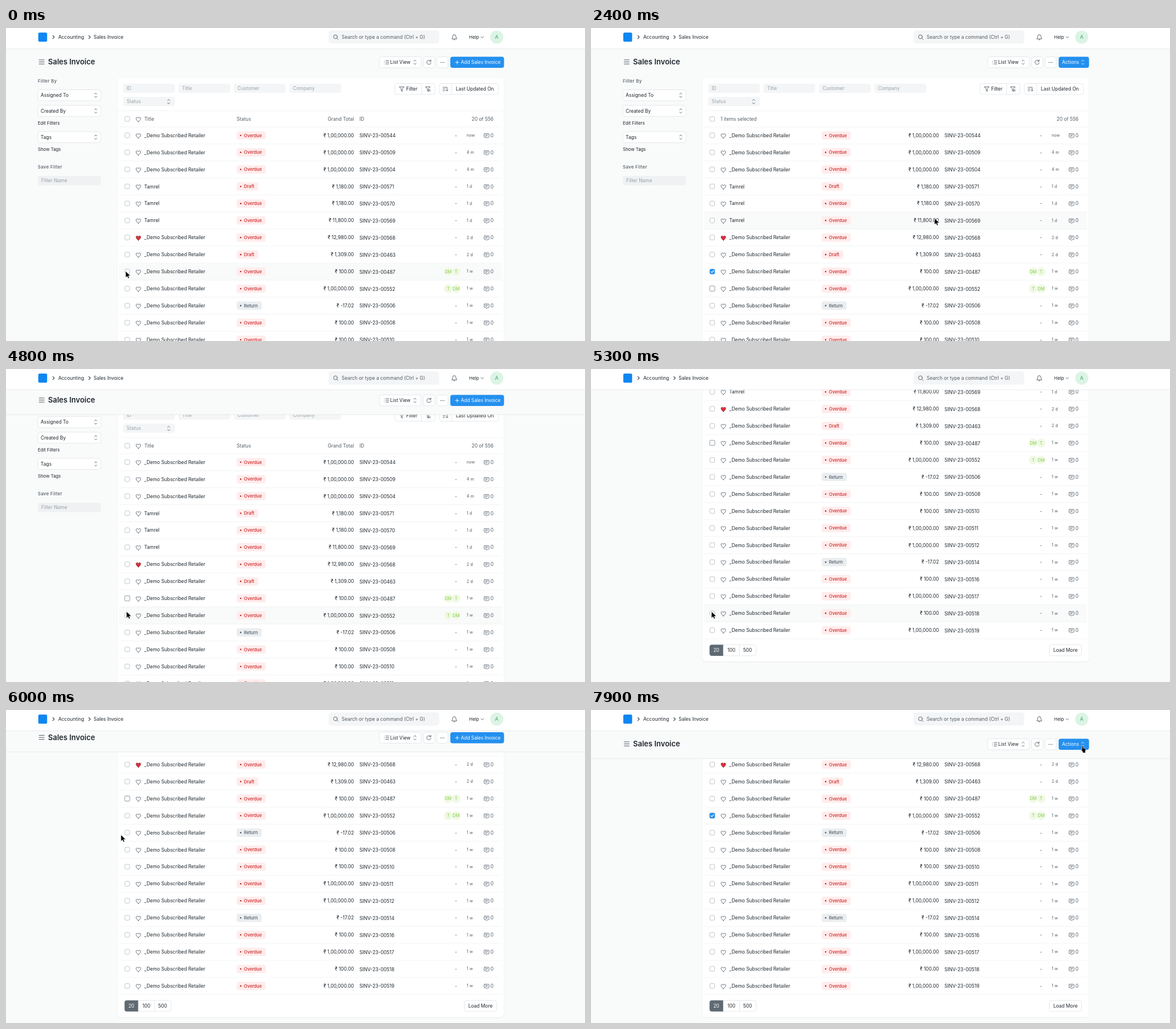
These frames come from a looping animation (1019 px wide and 550 px high, 8000 ms). An HTML page:

```html
<!DOCTYPE html>
<html lang="en">
<head>
<meta charset="utf-8">
<title>Sales Invoice list</title>
<style>
  html, body { margin: 0; width: 100%; height: 100%; overflow: hidden; background: #f9fafa; }
  svg { display: block; width: 1019px; height: 550px; }
  text { font-family: Inter, sans-serif; white-space: pre; }
  .ln { fill: none; stroke: #4c5a67; stroke-width: .9; stroke-linecap: round; stroke-linejoin: round; }
</style>
</head>
<body>
<svg id="stage" viewBox="0 0 1019 550" xmlns="http://www.w3.org/2000/svg"></svg>
<script>
const LOOP = 8000, PITCH = 29.92, FIRST = 188.7;
const INK = '#1f272e', GREY = '#505a62', HINT = '#98a1a9', BLUE = '#2490ef', PAGE = '#f9fafa';

// Drawing helpers: every label is placed by the middle of its capitals.
const text = (x, cy, s, { size = 8.42, fill = INK, weight = 400, anchor = 'start', gap = 0 } = {}) =>
  `<text x="${x}" y="${(cy + size * .364).toFixed(2)}" font-size="${size}" fill="${fill}" font-weight="${weight}" text-anchor="${anchor}"${gap ? ` letter-spacing="${gap}"` : ''}>${s}</text>`;
const box = (x, y, w, h, r, fill, extra = '') =>
  `<rect x="${x}" y="${y}" width="${w}" height="${h}" rx="${r}" fill="${fill}" ${extra}/>`;
const disc = (x, y, r, fill, extra = '') => `<circle cx="${x}" cy="${y}" r="${r}" fill="${fill}" ${extra}/>`;
const line = (d, extra = '') => `<path class="ln" d="${d}" ${extra}/>`;
const rule = (x1, x2, y, color = '#eef0f2') => `<path d="M${x1} ${y}H${x2}" stroke="${color}" stroke-width=".7"/>`;
const group = (id, body) => `<g id="${id}">${body}</g>`;

const button = (x, cy, w, fill = '#fff', h = 19.4) =>
  box(x, cy - h / 2, w, h, 4, fill, fill === '#fff' ? 'stroke="#dfe3e6" stroke-width=".8"' : '');
const sorter = (x, cy, color = '#4c5a67') =>
  line(`M${x - 2} ${cy - 1.9}l2-2 2 2M${x - 2} ${cy + 1.9}l2 2 2-2`, `style="stroke:${color}"`);
const chevron = (x, y) => line(`M${x - 1.3} ${y - 2.7}l2.7 2.7-2.7 2.7`, 'style="stroke:#333c44;stroke-width:1.1"');
const heart = (x, y, on) => line(
  `M${x} ${y + 4.2}C${x - 7} ${y - .6} ${x - 3.6} ${y - 6} ${x} ${y - 2.1}C${x + 3.6} ${y - 6} ${x + 7} ${y - .6} ${x} ${y + 4.2}Z`,
  on ? 'style="fill:#e02d3c;stroke:#8c3038"' : '');
const checkbox = (y, id = '') =>
  (id ? box(208.2, y - 5.4, 10.4, 10.8, 3.2, '#bcc3c9', `id="ring${id}"`) : '') +
  box(209.2, y - 4.2, 8.4, 8.4, 2.2, '#fff', 'stroke="#a9b2ba" stroke-width=".75"') +
  (id ? group('tick' + id, box(208.9, y - 4.5, 9, 9, 2.2, BLUE) +
    line(`M211.1 ${y + .2}l1.7 1.7 3.1-3.6`, 'style="stroke:#fff;stroke-width:1.2"')) : '');

const BADGES = {
  Overdue: [51, '#ffecec', '#cb2929'],
  Draft: [38, '#ffecec', '#cb2929'],
  Return: [44, '#ebeef0', '#4c5a67']
};
const badge = (y, name) => {
  const [w, bg, fg] = BADGES[name];
  return box(406, y - 7.3, w, 14.6, 3.6, bg) + disc(413, y, 1.3, fg) +
    text(418.8, y, name, { size: 7.7, fill: fg, weight: 500 });
};
const avatar = (x, y, s) => disc(x, y, 8, '#eff9e3', 'stroke="#fff" stroke-width=".8"') +
  text(x, y, s, { size: 7.5, fill: '#86cc4c', anchor: 'middle' });

// List data
const IDS = '544 509 504 571 570 569 568 463 487 552 506 508 510 511 512 514 516 517 518 519'.split(' ');
const LAKH = '1,00,000.00';
const AMOUNTS = [LAKH, LAKH, LAKH, '1,180.00', '1,180.00', '11,800.00', '12,980.00', '1,309.00', '100.00', LAKH,
  '-17.02', '100.00', '100.00', LAKH, LAKH, '-17.02', '100.00', LAKH, '100.00', LAKH];
const AGES = ['now', '4 m', '4 m', '1 d', '1 d', '1 d', '2 d', '2 d'];
const statusOf = i => i === 3 || i === 7 ? 'Draft' : AMOUNTS[i][0] === '-' ? 'Return' : 'Overdue';
const rowY = i => FIRST + i * PITCH;

function row(i) {
  const y = rowY(i);
  const people = { 8: ['DM', 'T'], 9: ['T', 'DM'] }[i];
  return checkbox(y - .1, i === 8 || i === 9 ? i : '') + heart(233, y + .6, i === 6) +
    text(243.3, y, i > 2 && i < 6 ? 'Tamrel' : '_Demo Subscribed Retailer') +
    badge(y, statusOf(i)) +
    text(612.3, y, '₹ ' + AMOUNTS[i], { anchor: 'end' }) +
    text(622, y + .5, 'SINV-23-00' + IDS[i]) +
    (people ? avatar(778.3, y, people[0]) + avatar(792.2, y, people[1])
            : text(792, y, '-', { anchor: 'middle', fill: GREY })) +
    text(810.8, y - .2, AGES[i] || '1 w', { size: 7.15, fill: GREY }) +
    line(`M842.6 ${y - 3}h6.4q1.2 0 1.2 1.2v4q0 1.2-1.2 1.2h-1.8l-1.4 1.6-1.4-1.6h-1.8q-1.2 0-1.2-1.2v-4q0-1.2 1.2-1.2ZM843.7 ${y - .8}h4.3M843.7 ${y + 1.2}h2.8`, 'style="stroke-width:.8"') +
    text(852.8, y, '0', { fill: GREY }) + rule(199.5, 872.5, y + 15);
}

const select = (cy, label) => button(56, cy, 111) + text(61, cy, label) + sorter(158, cy);
const sidebar = () =>
  text(56, 93.4, 'Filter By', { size: 7.8, fill: GREY, weight: 500, gap: .35 }) +
  select(118.2, 'Assigned To') + select(145.7, 'Created By') +
  text(56, 167, 'Edit Filters', { size: 7.8 }) + select(191.8, 'Tags') +
  text(56, 213, 'Show Tags', { size: 7.8 }) +
  text(56, 244.4, 'Save Filter', { size: 7.8, fill: GREY, weight: 500, gap: .35 }) +
  box(56, 260, 111, 16.6, 4, '#eff1f2') + text(62, 268.4, 'Filter Name', { fill: HINT });

const funnel = (x, cross) => line(`M${x - 4} 103.4h8l-3.1 3.9v3.9l-1.8-1v-2.9Z`) +
  (cross ? line(`M${x + 1.4} 108.2l3 3M${x + 4.4} 108.2l-3 3`) : '');
const filters = () => ['ID', 'Title', 'Customer', 'Company'].map((s, i) =>
    box(206 + i * 97.6, 97.8, 91, 16.3, 4, '#f4f5f6') + text(212.3 + i * 97.6, 106, s, { fill: HINT })).join('') +
  box(206, 121, 91, 16.3, 4, '#f4f5f6') + text(212.3, 129.2, 'Status', { fill: HINT }) + sorter(286.3, 129.4) +
  button(684.3, 107.2, 70.8) + rule(731.2, 731.9, 107.2, '#e2e6e9') +
  `<path d="M731.5 97.6v19.2M784.4 97.6v19.2" stroke="#dfe3e6" stroke-width=".8"/>` +
  funnel(696.5) + text(704.2, 107.2, 'Filter') + funnel(742.5, true) +
  button(762.7, 107.2, 104).replace('#fff', 'none') +
  line('M769 104.2h6M769 107.2h4M769 110.2h3M776.2 104v6.6M774.4 109l1.8 1.8 1.8-1.8') +
  text(791.8, 107.2, 'Last Updated On');

function footer() {
  const y = 792.3, mid = (x, s, fill = INK) => text(x, y, s, { fill, anchor: 'middle' });
  return button(208.7, y, 81.8) + `<path d="M232.6 782.6H212.7q-4 0-4 4v11.4q0 4 4 4h19.9Z" fill="#5f6a73"/>` +
    `<path d="M261.5 782.7v19.2" stroke="#dfe3e6" stroke-width=".8"/>` +
    mid(220.6, '20', '#fff') + mid(247, '100') + mid(275.6, '500') +
    button(806.5, y, 57) + mid(835, 'Load More');
}

const card = () =>
  box(195.2, 87.6, 681.8, 725.4, 6.5, '#e9ecee') + box(195.7, 87.4, 680.8, 724.6, 6.2, '#fff') +
  filters() + rule(196, 876.5, 145.6) + rule(199.5, 872.5, 174) +
  `<rect id="hover" x="199.5" width="673" height="${PITCH}" fill="#f9fafa"/>` +
  checkbox(159.8) +
  group('columns', heart(233, 160.4) + text(243.4, 159.8, 'Title', { fill: GREY }) +
    text(406, 159.8, 'Status', { fill: GREY }) + text(612.3, 159.8, 'Grand Total', { fill: GREY, anchor: 'end' }) +
    text(622, 159.8, 'ID', { fill: GREY })) +
  group('picked', '') + text(858, 159.8, '20 of 556', { fill: GREY, anchor: 'end' }) +
  IDS.map((_, i) => row(i)).join('') + footer();

const tools = () => button(657.3, 60.2, 73.2) +
  line('M668.6 57.3h5M668.6 60.2h5M668.6 63.1h5M666 57.3h.1M666 60.2h.1M666 63.1h.1') +
  text(676, 60.2, 'List View') + sorter(719.7, 60.2) +
  button(734.6, 60.2, 19.6) + line('M747.2 57.9a3.7 3.7 0 1 0 .8 2.9M747.9 55.8v2.6h-2.6') +
  button(758.2, 60.2, 19.6) + [765.2, 768, 770.8].map(x => disc(x, 60.5, .65, '#333c44')).join('');

const head = () => box(0, 36, 1019, 49, 0, PAGE) + group('headLine', rule(0, 1019, 85.2, '#dde1e4')) +
  line('M58.3 56h9M58.3 59.6h9M58.3 63.2h9', 'style="stroke-width:1"') +
  text(74, 59.6, 'Sales Invoice', { size: 13, weight: 600 }) + group('tools', tools()) +
  group('add', button(782, 60.2, 94.5, BLUE) + line('M791 60.4h6M794 57.4v6', 'style="stroke:#fff"') +
    text(800.6, 60.2, 'Add Sales Invoice', { size: 8.3, fill: '#fff' })) +
  group('actions', button(823, 60.2, 53.5, BLUE) + text(829, 60.2, 'Actions', { fill: '#fff' }) +
    sorter(865.5, 60.2, '#fff'));

const navbar = () => box(0, 0, 1019, 36.3, 0, '#fff') + rule(0, 1019, 36.5, '#e2e6e9') +
  box(56.8, 8, 15.6, 16, 2.6, '#0f86f2') + chevron(83.6, 16) + text(92, 16, 'Accounting') +
  chevron(147, 16) + text(154.3, 16, 'Sales Invoice') +
  box(567.7, 4.3, 194.8, 23.2, 5, '#f4f5f6') +
  `<circle class="ln" cx="579.8" cy="15.4" r="3.4"/>` + line('M582.4 18l2.2 2.2') +
  text(590.8, 16, 'Search or type a command (Ctrl + G)', { fill: GREY }) +
  line('M784.8 18.8q1.4-1.6 1.4-4.2a2.8 3 0 0 1 5.6 0q0 2.6 1.4 4.2ZM787.8 20.6q1.2 1 2.4 0') +
  text(815, 16, 'Help', { size: 8 }) + line('M836 15.2l2.3 2.2 2.3-2.2') +
  disc(863.7, 16, 11.6, '#dcf4e5') + text(863.7, 16, 'A', { size: 9, fill: '#46a86c', anchor: 'middle' });

const pointer = () => group('cursor',
  `<path id="arrow" d="M.5.3V11.6L3.2 9.2 5 13.1 7 12.3 5.3 8.4H9Z" fill="#000" stroke="#fff" stroke-width=".6"/>` +
  `<path id="hand" d="M2.3 1.6q1-1.2 2 0V5l3.2.7q1.3.4 1.2 1.8L8 10.6V13.2H3.6V11.6L.8 8.2q-.4-1.4 1.5-.7Z" fill="#000" stroke="#fff" stroke-width=".5"/>`);

const $ = id => document.getElementById(id);
$('stage').innerHTML = box(0, 0, 1019, 550, 0, PAGE) +
  group('page', sidebar() + card()) + group('head', head()) + navbar() + pointer();

// Timelines: [start, value...]; each value holds until the next start.
const CURSOR = [[0, 210, 427], [100, 211.5, 427], [700, 206, 437], [800, 209, 450], [900, 211.5, 453], [1100, 210, 456],
  [1700, 330, 400], [1800, 600, 280], [1900, 805, 214], [2100, 720, 240], [2200, 640, 280], [2300, 562, 315],
  [2400, 604, 334], [4100, 211.5, 426], [5700, 211, 400], [5800, 207, 330], [5900, 203, 262], [6000, 201.7, 219],
  [6100, 202, 205], [6200, 203, 196], [6300, 203.3, 191], [6400, 206, 185], [6600, 210, 184], [6700, 213, 184],
  [7300, 560, 90], [7400, 893, 16], [7700, 885, 38], [7800, 872, 56], [7900, 862, 62]];
const SCROLL = [[0, 0], [4800, 25], [5000, 180], [5100, 285], [5300, 298.1], [5500, 292], [5600, 283.8], [5700, 276], [5800, 272.3]];
const HEAD = [[0, 0], [4800, -5], [5000, -35], [5100, -50], [5800, -46], [5900, -28], [6000, -11.5], [6100, -3.8], [6200, -.6], [6300, 0]];
const COUNT = [[0, 0], [700, 1], [900, 2], [1700, 1], [4600, 0], [7100, 1]];
const TICK8 = [[0, 0], [500, 1], [4500, 0]];
const TICK9 = [[0, 0], [1400, 1], [1600, 0], [6900, 1]];
const FOCUS = [[0, 0], [500, 8], [1400, 9], [4500, 8], [6900, 9]];

const at = (keys, t) => keys.findLast(k => k[0] <= t).slice(1);
const show = (id, on) => $(id).setAttribute('display', on ? 'inline' : 'none');
const move = (id, x, y) => $(id).setAttribute('transform', `translate(${x} ${y})`);

function draw(t) {
  const [x, y] = at(CURSOR, t), [scroll] = at(SCROLL, t), [lift] = at(HEAD, t);
  const [count] = at(COUNT, t), [focus] = at(FOCUS, t);
  move('page', 0, -scroll);
  move('head', 0, lift);
  move('cursor', x, y);
  show('headLine', scroll > 0 && lift > -49);

  // A resting pointer keeps its row highlighted while the list slides beneath it.
  const base = t >= 5300 && t < 5700 ? 298.1 : scroll;
  const over = Math.floor((y + base - FIRST + PITCH / 2) / PITCH);
  show('hover', x > 204 && x < 872 && y > 85 && over >= 0 && over < IDS.length);
  $('hover').setAttribute('y', rowY(over) - PITCH / 2);

  show('tick8', at(TICK8, t)[0]);
  show('tick9', at(TICK9, t)[0]);
  show('ring8', focus === 8);
  show('ring9', focus === 9);

  const label = count ? text(228, 159.8, `${count} items selected`, { fill: GREY }) : '';
  if (draw.label !== label) $('picked').innerHTML = draw.label = label;
  show('columns', !count);
  show('add', !count);
  show('actions', count);
  move('tools', count ? 40.8 : 0, 0);

  show('hand', t >= 7900);
  show('arrow', t < 7900);
}

const start = performance.now();
function loop() {
  draw((performance.now() - start) % LOOP);
  requestAnimationFrame(loop);
}
loop();
</script>
</body>
</html>
```
